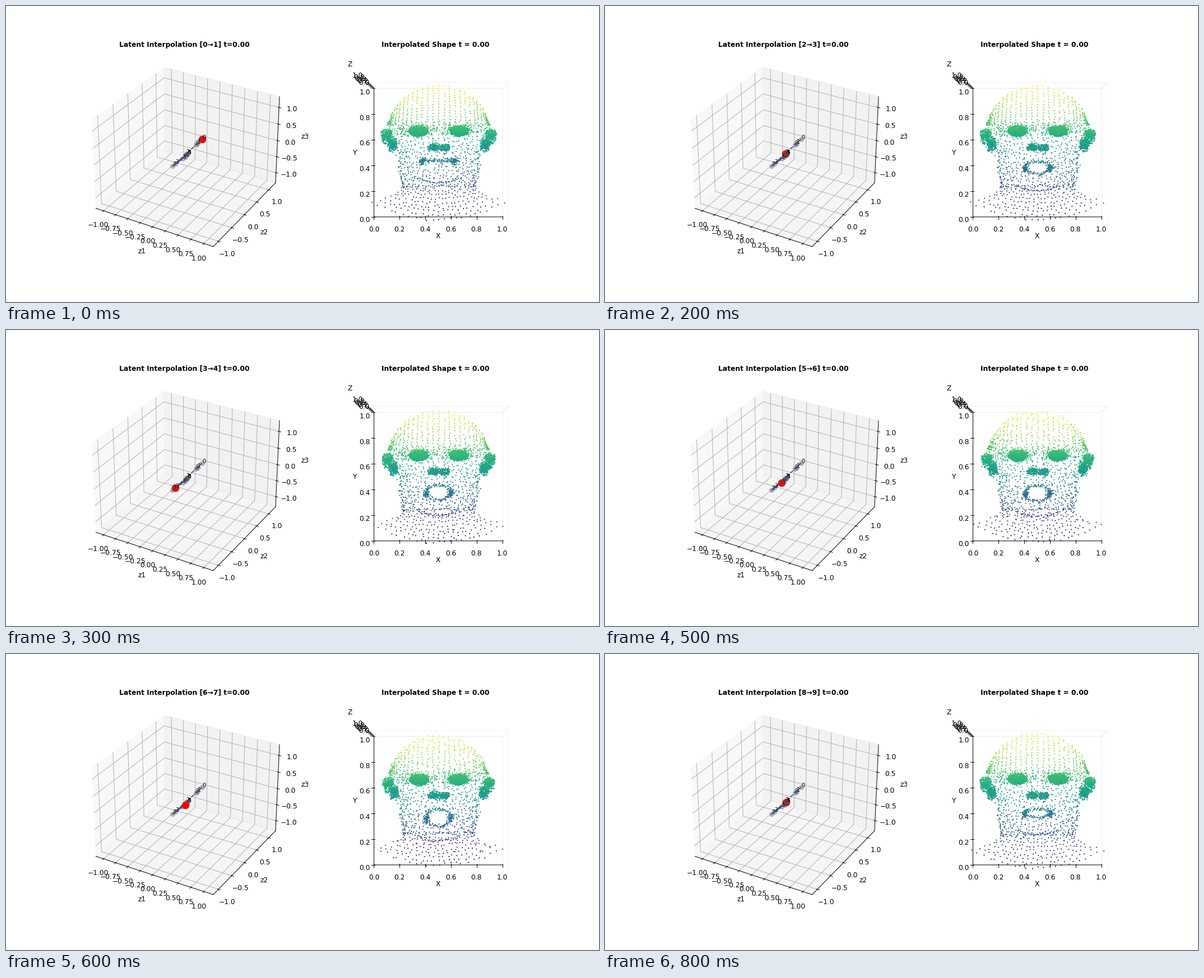
A matplotlib script that plays this animation: 1058x529 px, repeating every 900 ms.

```python
import numpy as np
import matplotlib.pyplot as plt
from matplotlib.animation import FuncAnimation

STEPS = 9
NOISY_STEP = 1
FRONT_STEP = 6          # the latent point nearest to the viewer

# Latent codes: position along the main axis, plus a small sideways drop.
CENTER = np.array([0.008, 0.055, 0])
MAIN_AXIS = np.array([0.17, 0.233, 0.32])
DROP = np.array([0.00244, -0.00449, -0.0127])
ALONG = np.array([1, .68, -.08, -.82, .015, -.33, -.155, -1, -.02, .57])
DROPS = np.array([0, 0, 0, 0, 3.6, 3, 4, 0, 2.4, 0])
latents = CENTER + ALONG[:, None] * MAIN_AXIS + DROPS[:, None] * DROP

# Face pose per step: scale, mouth half width, mouth half height,
# mouth centre, chin, roughness
POSES = {
    0: (1.0, 30, 1.5, 276.5, 316, 0.5),
    2: (1.0, 23, 10.5, 289, 330, 0.6),
    3: (0.98, 23, 13, 291, 333, 0.9),
    4: (0.965, 23, 16, 294.5, 338, 1.3),
    5: (0.97, 23, 14, 293, 336, 1.2),
    6: (0.965, 23, 15.5, 294, 337, 1.2),
    7: (0.98, 23, 11, 289, 330, 0.9),
    8: (1.0, 24, 7, 284.5, 323, 0.7),
}


def grid(xs, ts):
    a, b = np.meshgrid(xs, ts)
    return a.ravel(), b.ravel()


def blob(rng, n, x, y, sx, sy):
    return rng.normal(x, sx, n), rng.normal(y, sy, n)


def disc(rng, n, x, y, rx, ry):
    r, a = np.sqrt(rng.random(n)), rng.uniform(0, 2 * np.pi, n)
    return x + rx * r * np.cos(a), y + ry * r * np.sin(a)


def dome(rng):
    u, t = grid(np.sin(np.linspace(-1.45, 1.45, 27)), np.linspace(0, 1, 15))
    top = 215 - 72 * np.sqrt(1 - u ** 2)
    x = 92 * u * (0.95 + 0.05 * t)
    y = top + (213 - top) * t ** 1.1
    keep = rng.random(x.size) < 0.85
    return x[keep], y[keep]


def skin(rng, mouth_w, mouth_h, mouth_y):
    u, y = grid(np.sin(np.linspace(-1.45, 1.45, 27)), np.arange(209, 328, 5))
    x = u * np.interp(y, [205, 235, 262, 300, 325], [90, 86, 74, 70, 65])
    x = x + rng.normal(0, 1.8, x.size)
    y = y + rng.normal(0, 1.8, y.size)
    inside = (x / mouth_w) ** 2 + ((y - mouth_y) / mouth_h) ** 2 < 1
    keep = ~inside & (rng.random(x.size) < 0.97)
    return x[keep], y[keep]


def shoulders(rng):
    u, t = grid(np.linspace(-1, 1, 23), np.linspace(0, 1, 9))
    x = u * (64 + 54 * t ** 2) + rng.normal(0, 1.2, u.size)
    y = 322 + t * (28 + 32 * (1 - u ** 2)) + rng.normal(0, 1.2, u.size)
    return x, y


def face(rng, pose):
    scale, mw, mh, my, chin, rough = pose
    parts = [dome(rng), skin(rng, mw, mh, my), shoulders(rng),
             blob(rng, 50, 0, 252, 9, 4)]
    for side in (-1, 1):
        parts += [
            disc(rng, 650, 36.5 * side, 223.5, 17, 9.5),
            blob(rng, 140, 36.5 * side, 222, 16, 6),
            disc(rng, 170, 93 * side, 228, 10, 8),
            disc(rng, 110, 94 * side, 237, 8, 10),
            disc(rng, 150, 83 * side, 248, 9, 14),
            disc(rng, 90, 83 * side, 247, 6, 8),
            disc(rng, 120, 10.5 * side, 253, 10, 6.5),
            blob(rng, 45, (mw - 1) * side, my + 1, 2.6, 3.2),
        ]
    a = np.linspace(0, 2 * np.pi, 120)
    parts.append((mw * np.cos(a) + rng.normal(0, 1.4, 120),
                  my + mh * np.sin(a) + rng.normal(0, 1.4, 120)))
    cx = np.linspace(-38, 38, 30)
    parts.append((cx, chin - 9 * (cx / 38) ** 2))
    x, y = (np.concatenate(p) for p in zip(*parts))
    x = x * scale + rng.normal(0, rough, x.size)
    y = 257 + (y - 257) * scale + rng.normal(0, rough, y.size)
    return x + 772, y


def cloud(rng):
    wide = rng.uniform(-93, 93, 2700) + rng.normal(0, 22, 2700)
    parts = [
        (wide, rng.normal(230, 12.5, 2700)),
        blob(rng, 1150, 0, 253, 52, 20),
        blob(rng, 330, 0, 288, 42, 22),
        (rng.uniform(-90, 90, 120) + rng.normal(0, 15, 120),
         rng.uniform(300, 370, 120)),
        (rng.uniform(-93, 93, 230), 212 - np.abs(rng.normal(0, 26, 230))),
        blob(rng, 60, 0, 165, 32, 10),
        (np.array([40, -87]), np.array([121, 391])),
    ]
    x, y = (np.concatenate(p) for p in zip(*parts))
    return np.clip(x, -126, 143) + 771, np.clip(y, 121, 391)


def shape(step):
    """Point cloud in axes units, placed on the middle depth plane."""
    rng = np.random.default_rng(7)
    x, y = cloud(rng) if step == NOISY_STEP else face(rng, POSES[step])
    return 0.5 + (x - 770.9) / 239.9, 0.5 + (262.1 - y) / 239.9


fig = plt.figure(figsize=(12, 6), dpi=88.16667)

left = fig.add_subplot(121, projection="3d", computed_zorder=False)
left.set(xlim=(-1.16, 1.175), ylim=(-1.19, 1.30), zlim=(-1.32, 1.32),
         xlabel="z1", ylabel="z2", zlabel="z3")
path, = left.plot(*latents[:STEPS].T, "--", lw=1.5, zorder=2)
left.scatter(*latents.T, s=40, color="#505060", alpha=0.35,
             depthshade=False, zorder=5)
for i, p in enumerate(latents):
    left.text(*p, str(i), fontsize=8, zorder=4)

right = fig.add_subplot(122, projection="3d")
right.set(xlim=(0, 1), ylim=(0, 1), zlim=(0, 1),
          xlabel="X", ylabel="Y", zlabel="Z")
right.view_init(elev=90, azim=-90)
right.grid(False)
right.xaxis.line.set_snap(False)
for axis in (right.xaxis, right.yaxis, right.zaxis):
    axis.pane.fill = False

moving = []


def update(step):
    while moving:
        moving.pop().remove()
    path.set_color("#0000d8" if step == NOISY_STEP else "#42599f")
    x, y, z = latents[step]
    moving.append(left.scatter([x], [y], [z], s=100, color="red",
                               depthshade=False,
                               zorder=6 if step == FRONT_STEP else 3))
    px, py = shape(step)
    moving.append(right.scatter(px, py, np.full(px.size, 0.5), c=py, s=3.2,
                                cmap="viridis", linewidths=0,
                                depthshade=False))
    left.set_title(f"Latent Interpolation [{step}→{step + 1}] t=0.00",
                   fontsize=10, fontweight="bold")
    right.set_title("Interpolated Shape t = 0.00",
                    fontsize=10, fontweight="bold")
    return moving


anim = FuncAnimation(fig, update, frames=STEPS, interval=100,
                     repeat=True, repeat_delay=0, blit=False)
plt.show()
```
